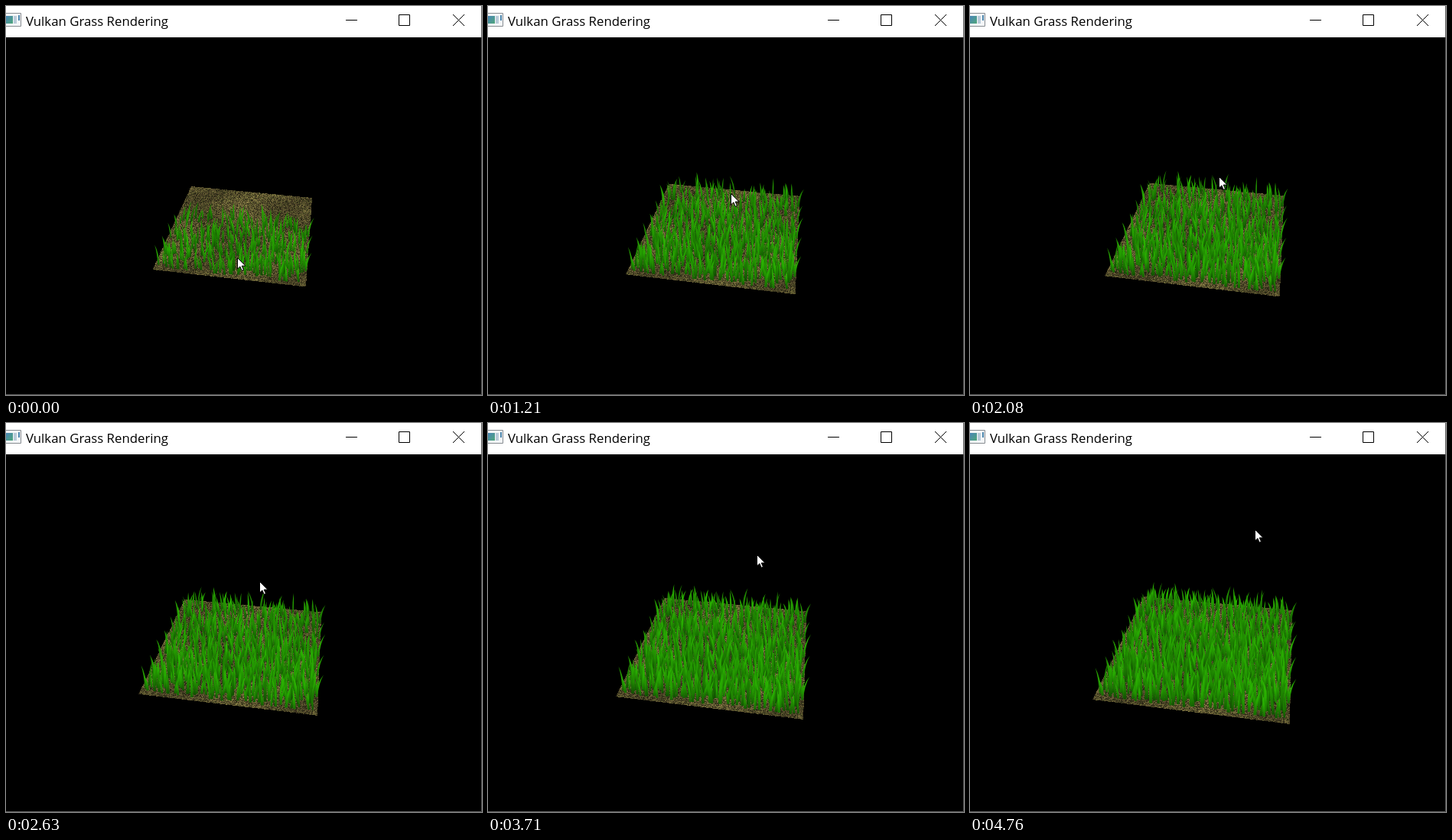
Recreate the animation shown at these times as an HTML page with a canvas. Size 622 px wide and 509 px high, loop 4860 ms.

```html
<!DOCTYPE html>
<html lang="en">
<head>
<meta charset="utf-8">
<title>Vulkan Grass Rendering</title>
<style>
  html, body { margin: 0; width: 100%; height: 100%; overflow: hidden; background: #000; }
  canvas, svg { position: absolute; left: 0; top: 0; display: block; }
  text { font: 16.8px "Open Sans", "Noto Sans", sans-serif; }
</style>
</head>
<body>
<canvas id="view" width="622" height="509"></canvas>
<svg width="622" height="509" viewBox="0 0 622 509">
  <defs>
    <linearGradient id="pane" x2="1" y2="1">
      <stop offset="0" stop-color="#4a86b8"/>
      <stop offset="1" stop-color="#4fa679"/>
    </linearGradient>
  </defs>
  <path fill="#fff" d="M0 0H621V41H0z"/>
  <path stroke="#5c5c5c" fill="none" d="M621.5 0V508.5H0"/>
  <path fill="#f4f6f8" stroke="#868b90" d="M-1 9.5H19.5V26.5H-1z"/>
  <path fill="url(#pane)" d="M0 13H9V23H0z"/>
  <path fill="#b9cbd9" d="M10 13H14V23H10z"/>
  <path fill="#4c86ad" d="M16 12H18V19H16z"/>
  <text x="26" y="26">Vulkan Grass Rendering</text>
  <path stroke="#000" fill="none" d="M444 18.5H459M513.5 11.5H527.5V25.5H513.5zM584 11L599 26M599 11L584 26"/>
</svg>
<script>
const LOOP = 4860;
const STEP = LOOP / 37;
const LAG = 22;

// the drag: time, zoom, pointer x, pointer y
const DRAG = [
  [LAG, 0, 302, 329], [550, .19, 313, 286], [1210, .37, 317, 245], [1690, .47, 324, 227],
  [2330, .5, 326, 221], [2630, .575, 331, 208], [3710, .775, 351, 172], [4760, 1, 372, 139]
];

// ground corners, clockwise from back left
const FAR = [[242, 236], [400, 251], [392, 367.5], [191.5, 345]];
const NEAR = [[227, 227], [421, 245], [418, 394], [160, 362]];
const BOX = { x: 156, y: 224, w: 270, h: 174 };
const GRID = 38;
const MAX_DEPTH = 5.72;

const ctx = document.getElementById('view').getContext('2d');
const ground = ctx.createImageData(BOX.w, BOX.h);
const mix = (a, b, k) => a + (b - a) * k;

function hash(i, j) {
  let h = Math.imul(i, 374761393) ^ Math.imul(j, 668265263);
  h = Math.imul(h ^ (h >>> 13), 1274126177);
  h = Math.imul(h ^ (h >>> 15), 2246822519);
  return ((h ^ (h >>> 16)) >>> 0) / 4294967296;
}

function makeBlades() {
  let n = 0;
  const rnd = () => hash(++n, 41);
  const list = [];
  const add = (u, v, lean, rank) => list.push({
    u, v, lean, rank, height: 1 + 1.1 * rnd(), width: .15 + .1 * rnd(), light: .72 + .38 * rnd()
  });
  for (let i = 0; i < GRID * GRID; i++) {
    const u = (i % GRID + rnd()) / GRID, v = (Math.floor(i / GRID) + rnd()) / GRID;
    add(mix(.035, .985, u), mix(.03, .975, v), (rnd() + rnd() - 1) * .35, rnd());
  }
  // blades leaning out over both sides
  for (let v = .95; v > .2; v -= .14) add(.025, v, -.2, 0);
  for (let v = .86; v > .1; v -= .18) add(.99, v, .32, 0);
  return list.sort((a, b) => a.v - b.v);
}
const blades = makeBlades();

function stateAt(t) {
  const i = Math.max(1, DRAG.findIndex(key => key[0] >= t));
  const a = DRAG[i - 1], b = DRAG[i];
  const k = (t - a[0]) / (b[0] - a[0]);
  return a.map((n, j) => mix(n, b[j], k)).slice(1);
}

// perspective map from the unit square to the four corners
function projection(zoom) {
  const [[x0, y0], [x1, y1], [x2, y2], [x3, y3]] =
    FAR.map((p, i) => p.map((n, j) => mix(n, NEAR[i][j], zoom)));
  const ax = x1 - x2, bx = x3 - x2, sx = x0 - x1 + x2 - x3;
  const ay = y1 - y2, by = y3 - y2, sy = y0 - y1 + y2 - y3;
  const det = ax * by - bx * ay;
  const g = (sx * by - sy * bx) / det, h = (ax * sy - ay * sx) / det;
  return {
    a: x1 - x0 + g * x1, b: x3 - x0 + h * x3, c: x0,
    d: y1 - y0 + g * y1, e: y3 - y0 + h * y3, f: y0,
    g, h, back: Math.hypot(x1 - x0, y1 - y0)
  };
}

function drawGround({ a, b, c, d, e, f, g, h }) {
  const px = ground.data;
  for (let j = 0, o = 0; j < BOX.h; j++) {
    for (let i = 0; i < BOX.w; i++, o += 4) {
      const x = BOX.x + i + .5, y = BOX.y + j + .5;
      const w = (d * h - e * g) * x + (b * g - a * h) * y + a * e - b * d;
      const u = ((e - f * h) * x + (c * h - b) * y + b * f - c * e) / w;
      const v = ((f * g - d) * x + (a - c * g) * y + c * d - a * f) / w;
      px[o] = px[o + 1] = px[o + 2] = 0;
      px[o + 3] = 255;
      if (u < 0 || u > 1 || v < 0 || v > 1) continue;
      const p = u * 220 | 0, q = v * 220 | 0;
      const patch = .88 + .12 * Math.sin(u * 9 + 2 + 2 * Math.sin(v * 7));
      const light = patch * (.42 + .95 * hash(p, q));
      const warm = 14 * (hash(p + 500, q) - .4);
      px[o] = 102 * light + warm;
      px[o + 1] = 96 * light;
      px[o + 2] = 52 * light + warm * .6;
    }
  }
  ctx.putImageData(ground, BOX.x, BOX.y);
}

function drawBlade(s, x, y, unit) {
  const h = s.height * unit, half = s.width * unit / 2;
  const tx = x + s.lean * h, ty = y - h;
  const cx = x + s.lean * h * .15, cy = y - h * .6;
  const rgb = (r, g) => `rgb(${r * s.light | 0},${g * s.light | 0},1)`;
  const fill = ctx.createLinearGradient(0, y, 0, ty);
  fill.addColorStop(0, rgb(22, 104));
  fill.addColorStop(.5, rgb(37, 160));
  fill.addColorStop(1, rgb(42, 172));
  ctx.fillStyle = fill;
  ctx.beginPath();
  ctx.moveTo(x - half, y);
  ctx.quadraticCurveTo(cx - half, cy, tx, ty);
  ctx.quadraticCurveTo(cx + half, cy, x + half, y);
  ctx.fill();
}

// the closer the ground, the more blades survive the culling
function drawGrass(m) {
  for (const s of blades) {
    const w = m.g * s.u + m.h * s.v + 1;
    const depth = w * 1000 / m.back;
    if (depth > MAX_DEPTH || s.rank > .16 + .45 * (MAX_DEPTH - depth)) continue;
    const x = (m.a * s.u + m.b * s.v + m.c) / w;
    const y = (m.d * s.u + m.e * s.v + m.f) / w;
    drawBlade(s, x, y, m.back / 15 / w);
  }
}

const arrow = new Path2D('M0 0V14.5L3.4 11.4L5.7 16.8L8 15.8L5.7 10.6H10.4Z');
function drawPointer(x, y) {
  ctx.save();
  ctx.translate(Math.round(x) + .5, Math.round(y) + .5);
  ctx.fillStyle = '#fff';
  ctx.fill(arrow);
  ctx.strokeStyle = '#000';
  ctx.stroke(arrow);
  ctx.restore();
}

function render(t) {
  const [zoom, x, y] = stateAt(t);
  const m = projection(zoom);
  ctx.fillStyle = '#000';
  ctx.fillRect(0, 0, 622, 509);
  drawGround(m);
  drawGrass(m);
  drawPointer(x, y);
}

let shown = -1;
function tick() {
  const t = performance.now() % LOOP;
  const step = Math.min(36, Math.floor((t + LAG) / STEP));
  if (step !== shown) {
    shown = step;
    render(step * STEP + LAG);
  }
  requestAnimationFrame(tick);
}
tick();
</script>
</body>
</html>
```
